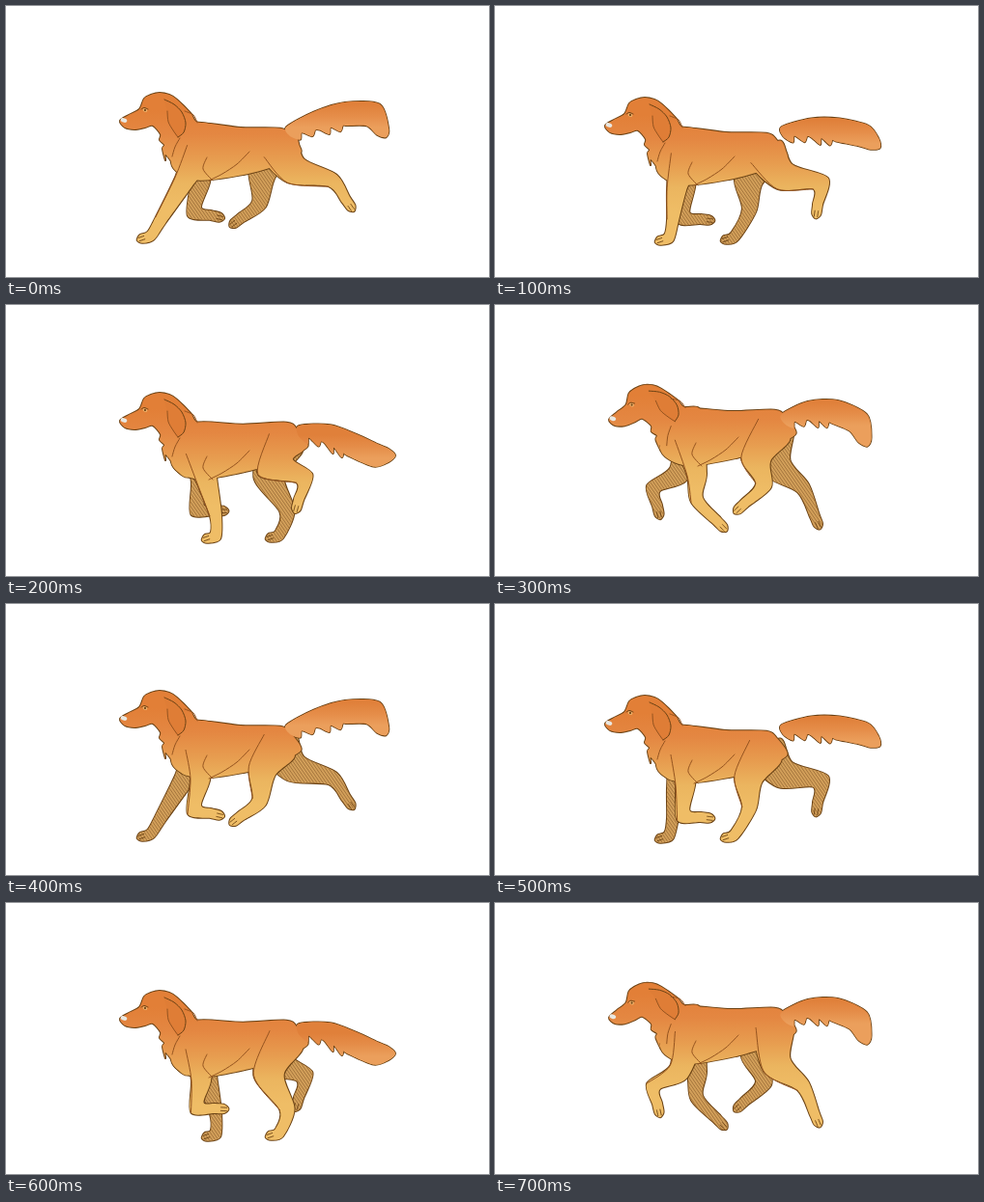
Recreate the animation shown at these times as an HTML page with a canvas. Size 500 px wide and 281 px high, loop 0.8 s.

```html
<!DOCTYPE html>
<html lang="en">
<head>
<meta charset="utf-8">
<title>Trotting dog</title>
<style>
html, body { margin: 0; height: 100%; overflow: hidden; background: #fff; }
canvas { display: block; }
</style>
</head>
<body>
<canvas id="stage" width="500" height="281"></canvas>
<script>
const ctx = document.getElementById('stage').getContext('2d');
const INK = '#6b4214', SOFT = '#94531f';

const pts = text => text.split(' ').map(s => s.split(',').map(Number));
const mix = (p, q, t = 0.5) => p.map((v, i) => v + (q[i] - v) * t);
const add = (p, x, y) => [p[0] + x, p[1] + y];

// Head and neck, hung from the nose so that tilting keeps the nose in place.
const NOSE = [118, 119];
const HEAD = pts('118,119 127,113 138,107 143,96 150,92 159,90 169,92 177,97 191,111 197,120 212,124 215,150 190,177 176,170 171,161 165,154 165,160 162,148 164,144 159,139 160,133 152,124 144,126 133,128 123,126');
const EAR = pts('164,97 174,102 182,110 186,121 184,131 178,136 173,129 168,120 167,109');

// Leg joints over one stride, an eighth of the cycle apart.
const FRONT = [
  '184,182 160,222 150,238', '188,190 184,222 180,240', '209,186 217,218 217,239', '209,176 209,202 230,224',
  '201,182 195,213 212,217', '197,188 195,219 213,221', '202,184 198,212 216,213', '190,175 164,190 168,208'
].map(pts);
const HIND = [
  '300,171 338,181 352,201', '300,177 337,184 334,206', '279,168 309,180 303,202', '270,160 278,187 258,206',
  '265,173 262,205 243,220', '262,182 263,212 248,239', '272,178 291,214 283,238', '292,168 319,190 331,219'
].map(pts);
const FRONT_WIDTHS = [14, 10, 6, 5, 4.5];
const HIND_WIDTHS = [19, 14, 7, 5, 4.5];
const TAIL_WIDTHS = [5, 10, 12, 11.5, 7];

const contact = { nose: [118, 119], tilt: 0, chest: [200, 151], hip: [283, 146],
  tail: pts('292,130 322,119 352,112 380,113 390,130') };
const passing = { nose: [118, 120], tilt: 0, chest: [200, 151], hip: [290, 141],
  tail: pts('303,130 333,134 358,145 383,156 396,156') };
const lift = { nose: [118, 119], tilt: -0.18, chest: [200, 137], hip: [289, 128],
  tail: pts('298,118 325,110 352,111 376,122 383,140') };
const down = { nose: [114, 124], tilt: 0, chest: [196, 156], hip: [280, 151],
  tail: contact.tail.map((p, i) => mix(p, passing.tail[i])) };
const poses = [contact, down, passing, lift];

function turn(points, pivot, angle, to = pivot) {
  const c = Math.cos(angle), s = Math.sin(angle);
  return points.map(([x, y]) => {
    const dx = x - pivot[0], dy = y - pivot[1];
    return [to[0] + dx * c - dy * s, to[1] + dx * s + dy * c];
  });
}

function curve(p, closed) {
  const n = p.length, path = new Path2D();
  const at = i => closed ? p[(i + n) % n] : p[Math.max(0, Math.min(n - 1, i))];
  path.moveTo(...p[0]);
  for (let i = 0; i < (closed ? n : n - 1); i++) {
    const [a, b, c, d] = [at(i - 1), at(i), at(i + 1), at(i + 2)];
    path.bezierCurveTo(b[0] + (c[0] - a[0]) / 7, b[1] + (c[1] - a[1]) / 7,
      c[0] - (d[0] - b[0]) / 7, c[1] - (d[1] - b[1]) / 7, ...c);
  }
  return path;
}

function heading(p, q) {
  const dx = q[0] - p[0], dy = q[1] - p[1], d = Math.hypot(dx, dy);
  return [dx / d, dy / d];
}

// A tapered tube around a chain of joints; edge is its front or lower side.
function tube(joints, widths, trim = e => e) {
  const last = joints.length - 1;
  const dir = i => heading(joints[i], joints[i + 1]);
  const side = sign => joints.map((p, i) => {
    const a = dir(Math.max(0, i - 1)), b = dir(Math.min(i, last - 1));
    const x = a[0] + b[0], y = a[1] + b[1], len = Math.hypot(x, y);
    const w = sign * widths[i] * Math.min(1.4, 2 / len) / len;
    return add(p, -y * w, x * w);
  });
  const edge = trim(side(1)), end = dir(last - 1), w = widths[last];
  const tip = add(joints[last], end[0] * w, end[1] * w);
  return { edge, tip, end, path: curve([...edge, tip, ...side(-1).reverse()], true) };
}

// Tufts of hair along the first part of an edge.
function fringe(edge) {
  return edge.flatMap((p, i) => {
    if (i > 1) return [p];
    const tuft = (t, drop) => add(mix(p, edge[i + 1], t), 0, drop);
    return [p, tuft(0.35, 6), tuft(0.4, -1), tuft(0.75, 5), tuft(0.85, -1)];
  });
}

// A low paw rests flat on the ground, a raised one points along the leg.
function leg(root, joints, widths) {
  const [, shin, paw] = joints;
  const [x, y] = paw[1] > 232 ? [-1, 0.35] : heading(shin, paw);
  return tube([root, ...joints, add(paw, x * 10, y * 10)], widths);
}

function pen(path, color = INK, width = 1.1) {
  ctx.strokeStyle = color;
  ctx.lineWidth = width;
  ctx.stroke(path);
}

function paint(path, fill) {
  ctx.fillStyle = fill;
  ctx.fill(path);
}

function blend(top, bottom, ...colors) {
  const g = ctx.createLinearGradient(0, top, 0, bottom);
  colors.forEach((c, i) => g.addColorStop(i / (colors.length - 1), c));
  return g;
}

function hatch(path) {
  ctx.save();
  ctx.clip(path);
  const lines = new Path2D();
  for (let x = 60; x < 400; x += 3.2) {
    lines.moveTo(x, 140);
    lines.lineTo(x + 80, 255);
  }
  pen(lines, '#986a35', 0.8);
  ctx.restore();
}

function toes({ tip, end: [x, y] }) {
  for (const s of [-1.5, 2]) {
    const p = add(tip, -2 * x - y * s, -2 * y + x * s);
    pen(curve([p, add(p, -6 * x, -6 * y)]), INK, 0.9);
  }
}

function dot([x, y], rx, ry, color) {
  ctx.fillStyle = color;
  ctx.beginPath();
  ctx.ellipse(x, y, rx, ry, 0.3, 0, 7);
  ctx.fill();
}

function drawFace({ nose, tilt }) {
  const place = points => turn(points, NOSE, tilt, nose);
  const line = (text, color, width) => pen(curve(place(pts(text))), color, width);
  // The ear swings twice as far as the head.
  const ear = place(turn(EAR, EAR[0], tilt));
  paint(curve(ear, true), '#df7d36');
  pen(curve(ear.slice(0, 6)), INK, 1);
  pen(curve(ear.slice(5)), SOFT, 1);
  line('185,109 194,113 198,121', SOFT, 1);
  line('180,137 175,146 172,156', SOFT, 1);
  const [eye, snout] = place([[144, 108], [122, 118.5]]);
  dot(eye, 2.4, 1.8, '#efb36b');
  dot(eye, 1.1, 1.1, INK);
  line('140,107 143,105.5 147,107', INK, 1);
  dot(snout, 3.4, 2.2, '#e9e8e2');
}

function drawDog(pose, phase) {
  const { chest, hip, tail, nose, tilt } = pose;
  const shade = chest[1] - 151;
  const coat = blend(108 + shade, 208 + shade, '#e27f37', '#e48742', '#e79c4f', '#ebb55f', '#efbd66');
  const legs = i => [leg(chest, FRONT[i], FRONT_WIDTHS), leg(hip, HIND[i], HIND_WIDTHS)];

  for (const far of legs((phase + 4) % 8)) {
    pen(far.path, INK, 2);
    paint(far.path, '#d3a05a');
    hatch(far.path);
    toes(far);
  }

  const near = legs(phase);
  const torso = tube([add(chest, -26, -3), chest, add(mix(chest, hip), 3, 2), hip, add(hip, 9, 2)],
    [18, 29.5, 24.5, 19, 14]);
  const brush = tube(tail, TAIL_WIDTHS, fringe);
  const head = curve(turn(HEAD, NOSE, tilt, nose), true);
  const parts = [torso.path, head, brush.path, ...near.map(l => l.path)];

  // Outline everything first, so that only the joint silhouette stays dark.
  parts.forEach(p => pen(p, INK, 2));
  parts.forEach(p => paint(p, coat));
  paint(brush.path, blend(tail[2][1] - 10, tail[2][1] + 14, '#e0803a', '#e58d49', '#eb9f5c'));

  near.forEach(l => {
    pen(curve(l.edge.slice(0, 3)), SOFT, 1);
    toes(l);
  });
  for (const crease of ['52,0 39,13 24,23 10,30', '8,6 4,18 14,30'])
    pen(curve(pts(crease).map(p => add(p, ...chest))), SOFT, 1);
  drawFace(pose);
}

function frame(now) {
  const phase = Math.floor(now / 100) % 8;
  ctx.clearRect(0, 0, 500, 281);
  drawDog(poses[phase % 4], phase);
  requestAnimationFrame(frame);
}

ctx.lineJoin = ctx.lineCap = 'round';
requestAnimationFrame(frame);
</script>
</body>
</html>
```
